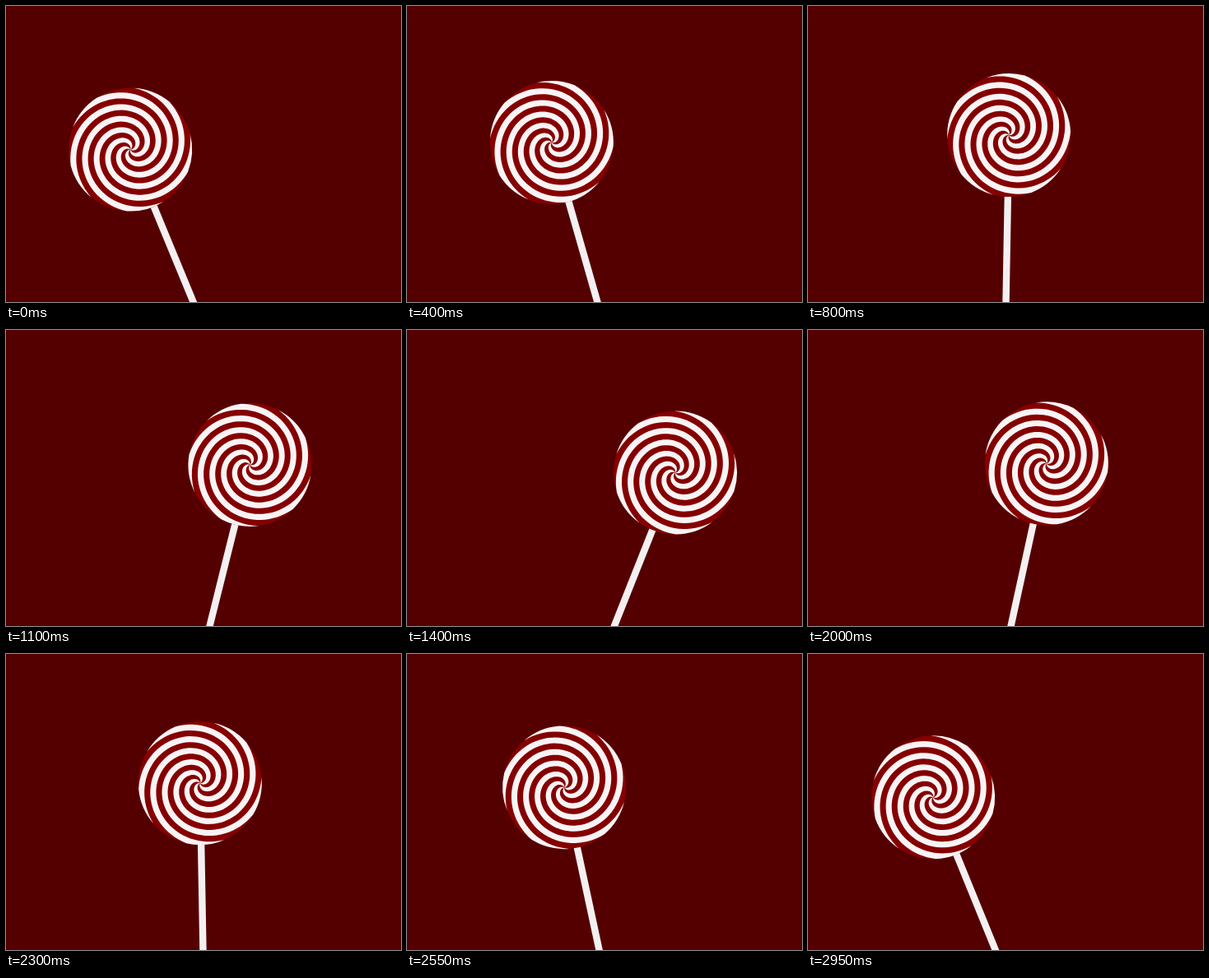
Write an HTML page with a canvas that moves like this. It is 480x360 px and loops after 3000 ms.

```html
<!DOCTYPE html>
<html lang="en">
<head>
<meta charset="utf-8">
<title>Swinging lollipop</title>
<style>
  html, body { margin: 0; width: 100%; height: 100%; overflow: hidden; background: #550000; }
  canvas { display: block; }
</style>
</head>
<body>
<canvas id="stage" width="480" height="360"></canvas>
<script>
const ctx = document.getElementById('stage').getContext('2d');

const LOOP = 3000, STEP = 50, LAG = 28;
const TAU = Math.PI * 2, RAD = Math.PI / 180;
const PIVOT = { x: 240, y: 390 };
const LENGTH = 233, RADIUS = 75, SWING = 22.46 * RAD;
const ARMS = 5, PITCH = 14.5;               // radial distance between stripes
const SLOPE = ARMS * PITCH / TAU;           // radius lost per radian, clockwise
const PHASE = 7.7 * RAD;                    // where a white stripe meets the rim
const BACK = '#550000', RED = '#850000', WHITE = '#f8f4f5', STICK = '#f4f0f2';

// Traces one stripe edge from radius `from` to radius `to`.
function edge(start, from, to) {
  const n = 90;
  for (let i = 0; i <= n; i++) {
    const r = from + (to - from) * i / n;
    const a = start + (RADIUS - r) / SLOPE;
    ctx.lineTo(r * Math.cos(a), r * Math.sin(a));
  }
}

function drawCandy() {
  const half = Math.PI / ARMS;
  ctx.fillStyle = RED;
  ctx.beginPath();
  ctx.arc(0, 0, RADIUS, 0, TAU);
  ctx.fill();

  ctx.fillStyle = WHITE;
  for (let i = 0; i < ARMS; i++) {
    const start = PHASE + i * TAU / ARMS;
    ctx.beginPath();
    edge(start, 0, RADIUS);
    ctx.arc(0, 0, RADIUS, start, start + half);
    edge(start + half, RADIUS, 0);
    ctx.fill();
  }
}

function draw(t) {
  const swing = -SWING * Math.cos(TAU * (t - LAG) / LOOP);
  ctx.fillStyle = BACK;
  ctx.fillRect(0, 0, 480, 360);

  ctx.save();
  ctx.translate(PIVOT.x, PIVOT.y);
  ctx.rotate(swing);
  ctx.fillStyle = STICK;
  ctx.fillRect(-4.2, -LENGTH + 40, 8.4, LENGTH);
  ctx.translate(0, -LENGTH);
  ctx.rotate(TAU * t / LOOP);
  drawCandy();
  ctx.restore();
}

const begin = performance.now();
function tick() {
  const t = (performance.now() - begin) % LOOP;
  draw(Math.floor(t / STEP) * STEP);
  requestAnimationFrame(tick);
}
tick();
</script>
</body>
</html>
```
